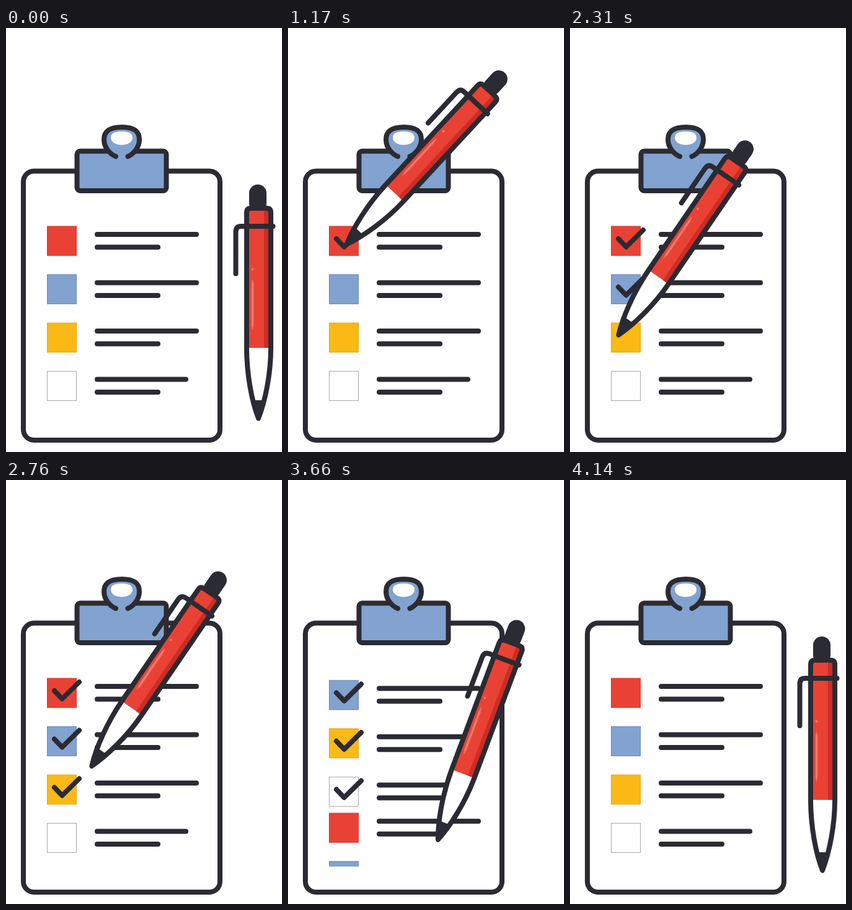
Write an HTML page that moves like this. It is 445 px wide and 680 px high and loops after 4500 ms.

```html
<!DOCTYPE html>
<html lang="en">
<head>
<meta charset="utf-8">
<title>Checklist</title>
<style>
  html, body { margin: 0; width: 100%; height: 100%; overflow: hidden; background: #fff; }
  svg { display: block; width: 445px; height: 680px; }
  .line { fill: none; stroke: #2b2b33; stroke-width: 8; stroke-linecap: round; stroke-linejoin: round; }
</style>
</head>
<body>
<svg viewBox="0 0 445 680">
  <defs>
    <clipPath id="page"><rect x="40" y="300" width="294" height="320"/></clipPath>
    <clipPath id="barrel"><path d="M388 289H427V513C427 555 418 598 407 626C396 598 388 555 388 513Z"/></clipPath>
  </defs>

  <rect class="line" x="28" y="229.5" width="317" height="431.5" rx="17"/>

  <g clip-path="url(#page)"><g id="done"></g><g id="fresh"></g></g>

  <g class="line">
    <rect x="114.5" y="197.5" width="144" height="63.5" rx="5" fill="#82a2d0"/>
    <path fill="#82a2d0" d="M177 206C167 202 158 191 158 179C158 165 168 159 187 159S215 165 215 179C215 191 206 202 196.5 206"/>
  </g>
  <path fill="#fff" d="M169 176C169 168 177 166 186.500 166S204 168 204 176C204 183 196 187.500 186.500 187.500S169 183 169 176Z"/>

  <g id="pen">
    <rect x="392" y="251" width="28" height="44" rx="14" fill="#2b2b33"/>
    <rect x="386" y="287" width="42" height="30" rx="7" fill="#e94235"/>
    <g clip-path="url(#barrel)">
      <rect x="380" y="513" width="54" height="120" fill="#fff"/>
      <rect x="380" y="291" width="54" height="222" fill="#e94235"/>
      <rect x="416" y="291" width="18" height="222" fill="#cc2d25"/>
      <rect x="380" y="597" width="54" height="40" fill="#2b2b33"/>
    </g>
    <path fill="#f0786b" d="M397.500 402L399.300 411V476L397.500 485L395.700 476V411Z"/>
    <circle cx="397.500" cy="387" r="2" fill="#f0786b"/>
    <path class="line" d="M388 513V296Q388 289 395 289H420Q427 289 427 296V513C427 555 418 598 407 626C396 598 388 555 388 513Z"/>
    <path class="line" d="M370.500 394V327Q370.500 318 379 318H430.500"/>
  </g>
</svg>
<script>
const LOOP = 4500, PITCH = 77.5, SCROLL = 310, TILT = 34.5;
const REST = { x: 407, y: 626, a: 0 };
const COLORS = ['#e94235', '#82a2d0', '#fab914', '#fff'];
const EDGES = ['#d63b30', '#6d8bb8', '#e2a816', '#aaa'];

// start, corner and end time of each tick, and how far the pen lifts past it
const ticks = [
  { from: 900, turn: 1100, to: 1440, lift: 10 },
  { from: 1640, turn: 1840, to: 2115, lift: 13 },
  { from: 2320, turn: 2520, to: 2790, lift: 22 },
  { from: 3000, turn: 3200, to: 3518, lift: 13 }
];

const [done, fresh, pen] = ['done', 'fresh', 'pen'].map(id => document.getElementById(id));

function add(parent, tag, attrs) {
  const el = document.createElementNS('http://www.w3.org/2000/svg', tag);
  for (const key in attrs) el.setAttribute(key, attrs[key]);
  return parent.appendChild(el);
}

function addRow(list, i, y) {
  add(list, 'rect', { x: 66.5, y: y + 318, width: 47, height: 47, fill: COLORS[i], stroke: EDGES[i] });
  add(list, 'path', { class: 'line', d: `M147 ${y + 331}H${i < 3 ? 307 : 290}M147 ${y + 351.5}H245` });
}

const keys = [{ t: 0, ...REST }];
ticks.forEach((tick, i) => {
  const y = i * PITCH, a = i ? TILT : 44;
  addRow(done, i, y);
  addRow(fresh, i, y);
  tick.start = { x: 78, y: y + 338 };
  tick.corner = { x: 90.5, y: y + 351 };
  tick.end = { x: 118, y: y + 324 };
  tick.el = add(done, 'polyline', { class: 'line' });
  if (!i) keys.push({ t: 772, ...tick.start, a });
  keys.push(
    { t: tick.from, ...tick.start, a },
    { t: tick.turn, ...tick.corner, a },
    { t: tick.to, x: tick.end.x + tick.lift, y: tick.end.y - tick.lift, a: TILT }
  );
});
keys.push({ t: 3845, ...REST }, { t: LOOP, ...REST });

function ease(t, from, to) {
  const u = Math.min(1, Math.max(0, (t - from) / (to - from)));
  return u * u * (3 - 2 * u);
}

function pose(t) {
  const i = keys.findIndex(k => k.t > t);
  const p = keys[i - 1], q = keys[i], u = ease(t, p.t, q.t);
  const mix = name => p[name] + (q[name] - p[name]) * u;
  return { x: mix('x'), y: mix('y'), a: mix('a') };
}

function drawTick(tick, t, tip) {
  let points = [];
  if (t > tick.from) {
    if (t < tick.turn) points = [tick.start, tip];
    else points = [tick.start, tick.corner, t < tick.to && tip.x < tick.end.x ? tip : tick.end];
  }
  tick.el.setAttribute('points', points.map(p => `${p.x},${p.y}`).join(' '));
}

function shift(list, y) {
  list.setAttribute('transform', `translate(0 ${y})`);
}

function draw(now) {
  const t = now % LOOP, tip = pose(t);
  ticks.forEach(tick => drawTick(tick, t, tip));
  // the fresh list sets off slightly before the finished one
  shift(done, -SCROLL * ease(t, 3436, 4140));
  shift(fresh, SCROLL * (1 - ease(t, 3384, 4140)));
  pen.setAttribute('transform',
    `translate(${tip.x - REST.x} ${tip.y - REST.y}) rotate(${tip.a} ${REST.x} ${REST.y})`);
}

let begin;
function frame(now) {
  begin ??= now;
  draw(now - begin);
  requestAnimationFrame(frame);
}
draw(0);
requestAnimationFrame(frame);
</script>
</body>
</html>
```
